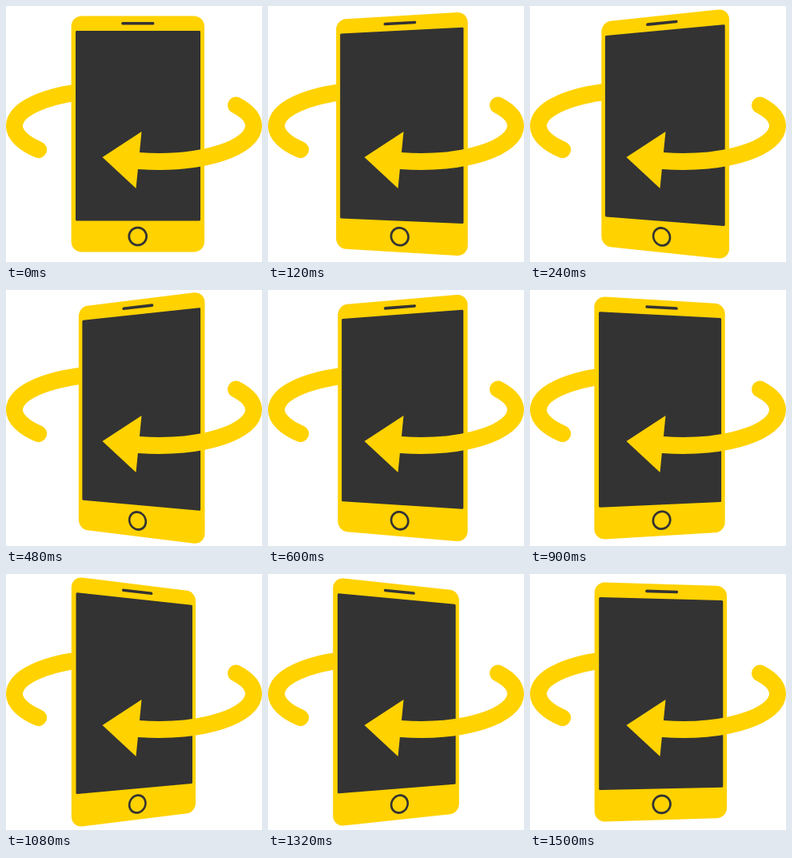
An HTML page for the animation above (1.56 s loop, 320 px wide and 320 px high).

```html
<!DOCTYPE html>
<html lang="en">
<head>
<meta charset="utf-8">
<title>Rotating phone</title>
<style>
  html, body { margin: 0; width: 100%; height: 100%; overflow: hidden; background: #fff; }
  svg { display: block; width: 320px; height: 320px; }
  .yellow { fill: #ffd200; }
  .dark { fill: #333; fill-rule: evenodd; }
  .arc { fill: none; stroke: #ffd200; stroke-width: 21; stroke-linecap: round; }
</style>
</head>
<body>
<svg viewBox="0 0 320 320">
  <path class="arc" d="M104 106.2C48 111.6 10.5 129 10.5 150C10.5 161 22 172 40.6 179.6"/>
  <path class="yellow" id="body"/>
  <path class="dark" id="details"/>
  <path class="arc" d="M160 193.4L166 193.6C250 199 309.5 176 309.5 150C309.5 140 301 131 287.5 124"/>
  <path class="yellow" d="M120.5 189L169.5 157L162.5 228Z"/>
</svg>
<script>
  const LOOP = 1560, STEP = 60;
  const SWING = 22 * Math.PI / 180, DEPTH = 450, MID = 160;
  const start = performance.now();

  // Outline of a rounded rectangle as points, corner by corner.
  function roundRect(x, y, w, h, r) {
    const points = [], n = 10;
    for (let corner = 0; corner < 4; corner++) {
      const cx = corner === 0 || corner === 3 ? x + w - r : x + r;
      const cy = corner < 2 ? y + h - r : y + r;
      for (let i = 0; i <= n; i++) {
        const a = (corner + i / n) * Math.PI / 2;
        points.push([cx + r * Math.cos(a), cy + r * Math.sin(a)]);
      }
    }
    return points;
  }

  const circle = (x, y, r) => roundRect(x - r, y - r, 2 * r, 2 * r, r);

  const parts = {
    body: [roundRect(81.6, 12.5, 166.4, 295, 13)],
    details: [
      roundRect(87, 31, 156, 237.5, 1.5),
      roundRect(144.2, 20, 41.2, 3.6, 1.8),
      circle(164.7, 288, 12.3),
      circle(164.7, 288, 9.5)
    ]
  };

  // Turn about the vertical middle axis, then apply perspective.
  function project([x, y], angle) {
    const scale = 1 / (1 - (x - MID) * Math.sin(angle) / DEPTH);
    const px = MID + (x - MID) * Math.cos(angle) * scale;
    const py = MID + (y - MID) * scale;
    return px.toFixed(2) + ' ' + py.toFixed(2);
  }

  function draw() {
    const t = Math.floor((performance.now() - start) / STEP + 0.05) * STEP;
    const angle = SWING * Math.sin(2 * Math.PI * (t % LOOP) / LOOP);
    for (const id in parts) {
      const d = parts[id].map(shape => 'M' + shape.map(p => project(p, angle)).join('L') + 'Z');
      document.getElementById(id).setAttribute('d', d.join(''));
    }
    requestAnimationFrame(draw);
  }
  draw();
</script>
</body>
</html>
```
